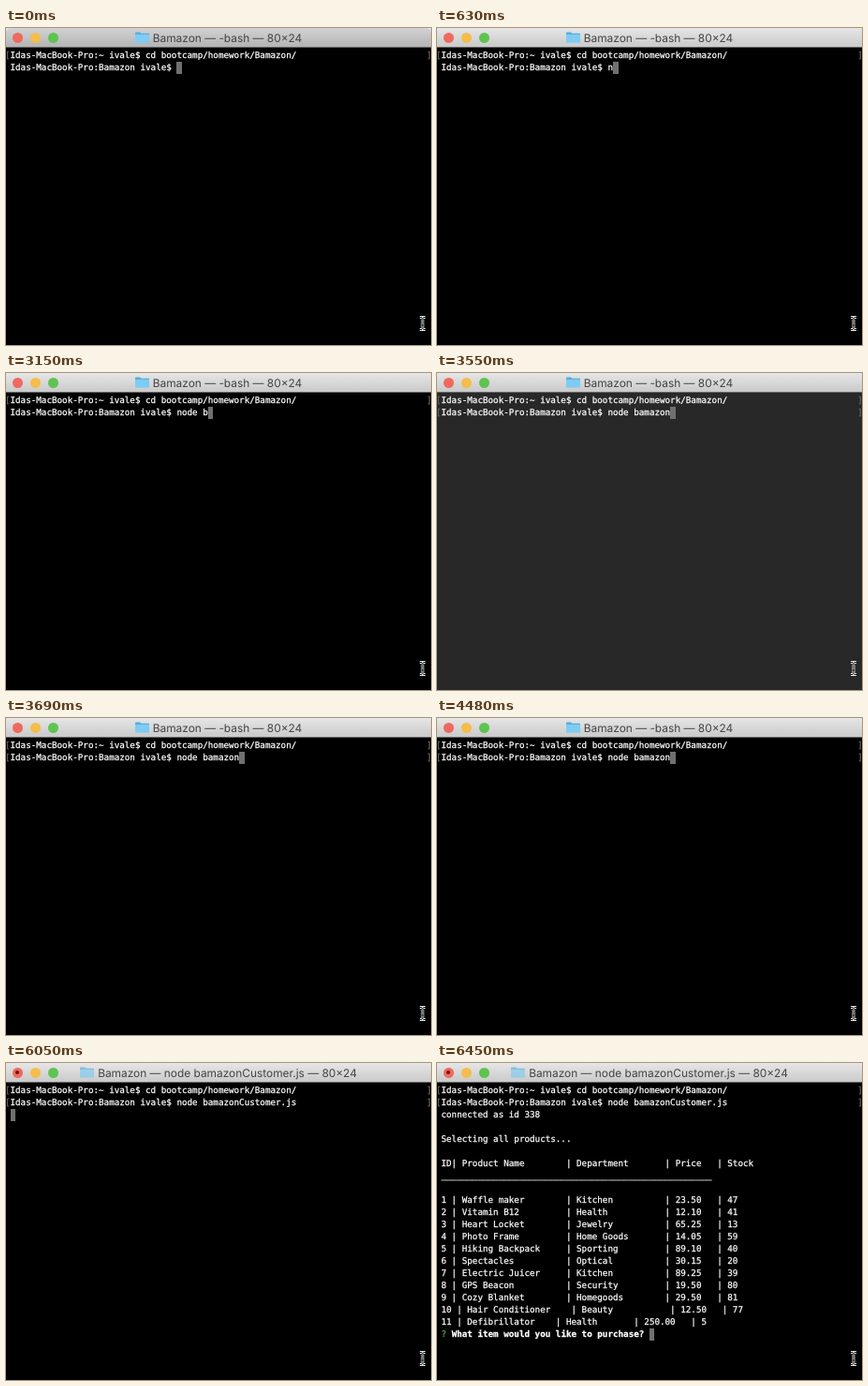
Recreate the animation shown at these times as an HTML page. Size 454 px wide and 338 px high, loop 8000 ms.

```html
<!DOCTYPE html>
<html lang="en">
<head>
<meta charset="utf-8">
<title>Terminal</title>
<style>
  html, body { margin: 0; width: 100%; height: 100%; overflow: hidden; background: #000; }
  body { position: relative; text-rendering: geometricPrecision; }
  [hidden] { display: none !important; }

  .screen {
    position: absolute; inset: 20px 0 0; overflow: hidden;
    background: #000; color: #fff;
    font: 9.24px/13px "DejaVu Sans Mono", "Liberation Mono", monospace;
    -webkit-text-stroke: .25px;
  }
  .screen.bell { background: #282828; }
  .text { position: absolute; left: 4.5px; top: 3.3px; }
  .row { position: relative; height: 13px; width: 80ch; white-space: pre; }
  .mark::before, .mark::after { position: absolute; top: 0; color: #666; }
  .mark::before { content: "["; left: -1ch; }
  .mark::after { content: "]"; left: 80ch; }
  .cursor {
    display: inline-block; width: 1ch; height: 13px;
    vertical-align: top; background: #707070;
  }
  .ask { color: #4fae3c; }

  .corners { position: absolute; inset: 0 0 auto; height: 20px; background: #e4e4e4; border-bottom: 1px solid #6c6c6c; }
  .bar {
    height: 20px; border-radius: 5px 5px 0 0;
    background: linear-gradient(#e6e6e6, #cacaca);
    display: flex; align-items: center; justify-content: center; gap: 4px;
    font: 11.9px/20px Inter, "Open Sans", sans-serif; color: #444; white-space: pre;
  }
  .bar.dim { background: linear-gradient(#d2d2d2, #b4b4b4); }
  .bar svg { flex: none; }
  .bar.busy svg { opacity: .65; }
  #title { transform: translateY(.5px); }
  .light { position: absolute; top: 4.5px; width: 11px; height: 11px; border-radius: 50%; }
  .busy .close::after {
    content: ""; position: absolute; left: 3.5px; top: 3.5px;
    width: 4px; height: 4px; border-radius: 50%; background: #6e1310;
  }
  .pointer { position: absolute; left: 439px; top: 305px; }
</style>
</head>
<body>
<div class="screen" id="screen">
  <div class="text">
    <div class="row mark">Idas-MacBook-Pro:~ ivale$ cd bootcamp/homework/Bamazon/</div>
    <div class="row" id="line">Idas-MacBook-Pro:Bamazon ivale$ <span id="typed"></span><span class="cursor" id="lineCursor"></span></div>
    <div class="row" id="waiting" hidden><span class="cursor"></span></div>
    <div id="output" hidden></div>
  </div>
</div>

<div class="corners">
  <div class="bar" id="bar">
    <i class="light close" style="left:6.5px;background:#ee695e"></i>
    <i class="light" style="left:25.5px;background:#f4bd4c"></i>
    <i class="light" style="left:44.5px;background:#5fc351"></i>
    <svg width="15" height="12" viewBox="0 0 15 12">
      <path d="M0 1.2Q0 .4 .8 .4H5L6.4 1.8H14.2Q15 1.8 15 2.6V6H0Z" fill="#57aede"/>
      <rect y="3" width="15" height="8.8" rx=".8" fill="#7fcbf3"/>
    </svg>
    <span id="title"></span>
  </div>
</div>

<svg class="pointer" width="12" height="20" fill="none">
  <path id="beam" d="M3 3.5H5L6 4.5L7 3.5H9M6 4.5V15.5M3 16.5H5L6 15.5L7 16.5H9M4.4 12H7.6" stroke="#e8e8e8" stroke-width="2.8"/>
  <path d="M3 3.5H5L6 4.5L7 3.5H9M6 4.5V15.5M3 16.5H5L6 15.5L7 16.5H9M4.4 12H7.6" stroke="#111"/>
</svg>

<script>
const LOOP = 8000;
const COMMAND = 'node bamazonCustomer.js ';
// [time, characters typed so far]
const KEYS = [[0, 0], [630, 1], [780, 2], [910, 3], [1040, 4], [1170, 5],
              [3150, 6], [3550, 12], [4740, 13], [5140, 24]];
const BRIGHT = 630, BELL = [3550, 3690], ENTER = 5920, RUNNING = 6050, RESULT = 6450;

const PRODUCTS = [
  ['Waffle maker', 'Kitchen', '23.50', 47],
  ['Vitamin B12', 'Health', '12.10', 41],
  ['Heart Locket', 'Jewelry', '65.25', 13],
  ['Photo Frame', 'Home Goods', '14.05', 59],
  ['Hiking Backpack', 'Sporting', '89.10', 40],
  ['Spectacles', 'Optical', '30.15', 20],
  ['Electric Juicer', 'Kitchen', '89.25', 39],
  ['GPS Beacon', 'Security', '19.50', 80],
  ['Cozy Blanket', 'Homegoods', '29.50', 81],
  ['Hair Conditioner', 'Beauty', '12.50', 77],
  ['Defibrillator', 'Health', '250.00', 5, 17, 13],
];

const $ = id => document.getElementById(id);

function productRow([name, dept, price, stock, nameWidth = 20, deptWidth = 17], i) {
  return `${i + 1} | ${name.padEnd(nameWidth)}| ${dept.padEnd(deptWidth)}| ${price}   | ${stock}`;
}

const lines = [
  'connected as id 338',
  '',
  'Selecting all products...',
  '',
  'ID| ' + 'Product Name'.padEnd(20) + '| ' + 'Department'.padEnd(17) + '| ' + 'Price'.padEnd(8) + '| Stock',
  '_'.repeat(52),
  '',
  ...PRODUCTS.map(productRow),
  '<span class="ask">?</span> <b>What item would you like to purchase?</b> <span class="cursor"></span>',
];
$('output').innerHTML = lines.map(s => `<div class="row">${s}</div>`).join('');

function render(t) {
  const [, count] = KEYS.findLast(([at]) => t >= at);
  $('typed').textContent = COMMAND.slice(0, count);
  $('line').classList.toggle('mark', t >= BELL[0]);
  $('screen').classList.toggle('bell', t >= BELL[0] && t < BELL[1]);
  $('lineCursor').hidden = t >= ENTER;
  $('waiting').hidden = t < ENTER || t >= RESULT;
  $('output').hidden = t < RESULT;
  $('bar').classList.toggle('dim', t < BRIGHT);
  $('bar').classList.toggle('busy', t >= RUNNING);
  const job = t < RUNNING ? '-bash' : COMMAND.trim();
  $('title').textContent = `Bamazon — ${job} — 80×24`;
}

function tick() {
  render(performance.now() % LOOP);
  requestAnimationFrame(tick);
}
tick();
</script>
</body>
</html>
```
